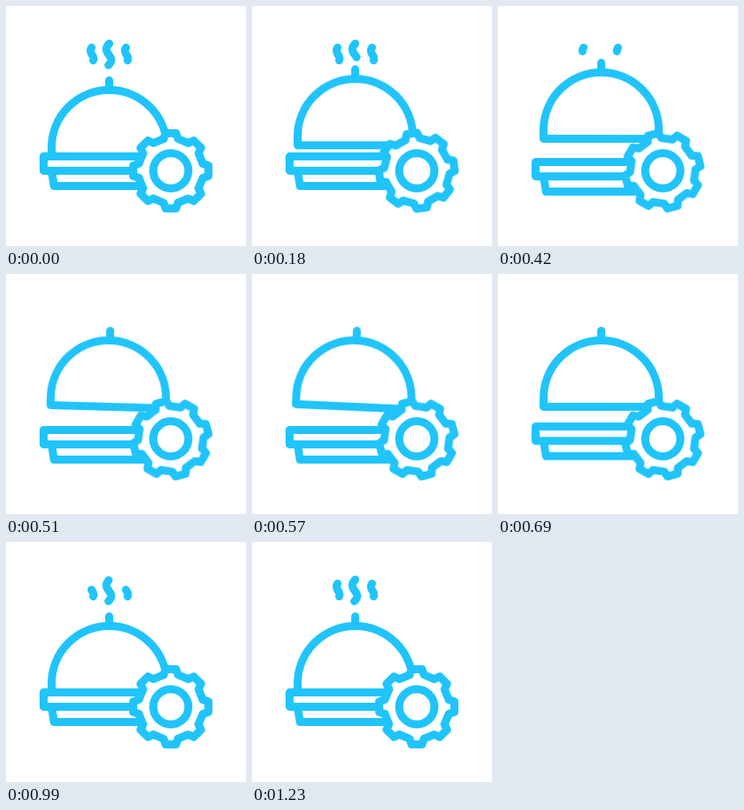
An HTML page without scripts that plays this animation: 300 px wide and 300 px high, repeating every 1.35 s.

```html
<!DOCTYPE html>
<html lang="en">
<head>
<meta charset="utf-8">
<title>Cloche and gear</title>
<style>
  html, body { margin: 0; width: 100%; height: 100%; overflow: hidden; background: #fff; }
  svg { display: block; width: 100%; height: 100%; }
  .ink { fill: none; stroke: #20c4fb; stroke-width: 10; stroke-linecap: round; stroke-linejoin: round; }
  .base, .lid, .tilt, .turn, .steam { animation: 1350ms infinite ease-in-out; }

  .base { animation-name: dip; }
  @keyframes dip {
    0%, 13.33%, 57.78%, 100% { transform: none; }
    31.11%, 42.22% { transform: translateY(7px); }
  }

  .lid { animation-name: lift; }
  @keyframes lift {
    0%, 4.44%, 71.11%, 100% { transform: none; }
    20%, 53.33% { transform: translateY(-22px); }
  }

  .tilt { animation-name: rattle; transform-origin: 129px 140px; }
  @keyframes rattle {
    0%, 15.56%, 32.22%, 51.11%, 100% { transform: rotate(0deg); }
    22.22%, 42.22% { transform: rotate(2.6deg); }
  }

  .turn { animation-name: turn; }
  @keyframes turn {
    0%, 4.44%, 73.33%, 100% { transform: rotate(0deg); }
    22.22%, 60% { transform: rotate(-15deg); }
  }

  /* Steam leaves through its tip, then grows again from its foot. */
  .steam { stroke-dasharray: 100 300; animation-timing-function: linear; }
  .mid { animation-name: mid; }
  .side { animation-name: side; }
  @keyframes mid {
    0%, 4.44% { stroke-dashoffset: 0; opacity: 1; }
    28.88% { stroke-dashoffset: -99; opacity: 1; }
    28.89% { stroke-dashoffset: -99; opacity: 0; }
    51.85% { stroke-dashoffset: 99; opacity: 0; }
    51.86% { stroke-dashoffset: 99; opacity: 1; }
    74.07%, 100% { stroke-dashoffset: 0; opacity: 1; }
  }
  @keyframes side {
    0%, 20% { stroke-dashoffset: 0; opacity: 1; }
    35.55% { stroke-dashoffset: -99; opacity: 1; }
    35.56% { stroke-dashoffset: -99; opacity: 0; }
    60.74% { stroke-dashoffset: 99; opacity: 0; }
    60.75% { stroke-dashoffset: 99; opacity: 1; }
    73.33% { stroke-dashoffset: 48; opacity: 1; }
    91.11%, 100% { stroke-dashoffset: 0; opacity: 1; }
  }
</style>
</head>
<body>
<svg viewBox="0 0 300 300">
  <defs>
    <path id="tooth" d="M-9-40L-6.5-47H6.5L9-40L21.9-34.6"/>
    <g id="pair"><use href="#tooth"/><use href="#tooth" transform="rotate(45)"/></g>
  </defs>
  <g class="ink">
    <path class="steam side" pathLength="100" d="M109 68C112 61 102 60 107 52"/>
    <path class="steam mid" pathLength="100" d="M128 74C140 62 117 60 129 47"/>
    <path class="steam side" pathLength="100" d="M152 68C155 61 145 60 150 52"/>
    <path class="base" d="M180 188H47V206H180M57 206L60 225H180"/>
    <g class="lid">
      <path class="tilt" d="M57 188V177A72 72 0 0 1 201 177V188ZM129 105V93"/>
    </g>
    <g transform="translate(206 206)">
      <circle r="43" fill="#fff" stroke="none"/>
      <g class="turn">
        <use href="#pair"/>
        <use href="#pair" transform="rotate(90)"/>
        <use href="#pair" transform="rotate(180)"/>
        <use href="#pair" transform="rotate(270)"/>
      </g>
      <circle r="22"/>
    </g>
  </g>
</svg>
</body>
</html>
```
